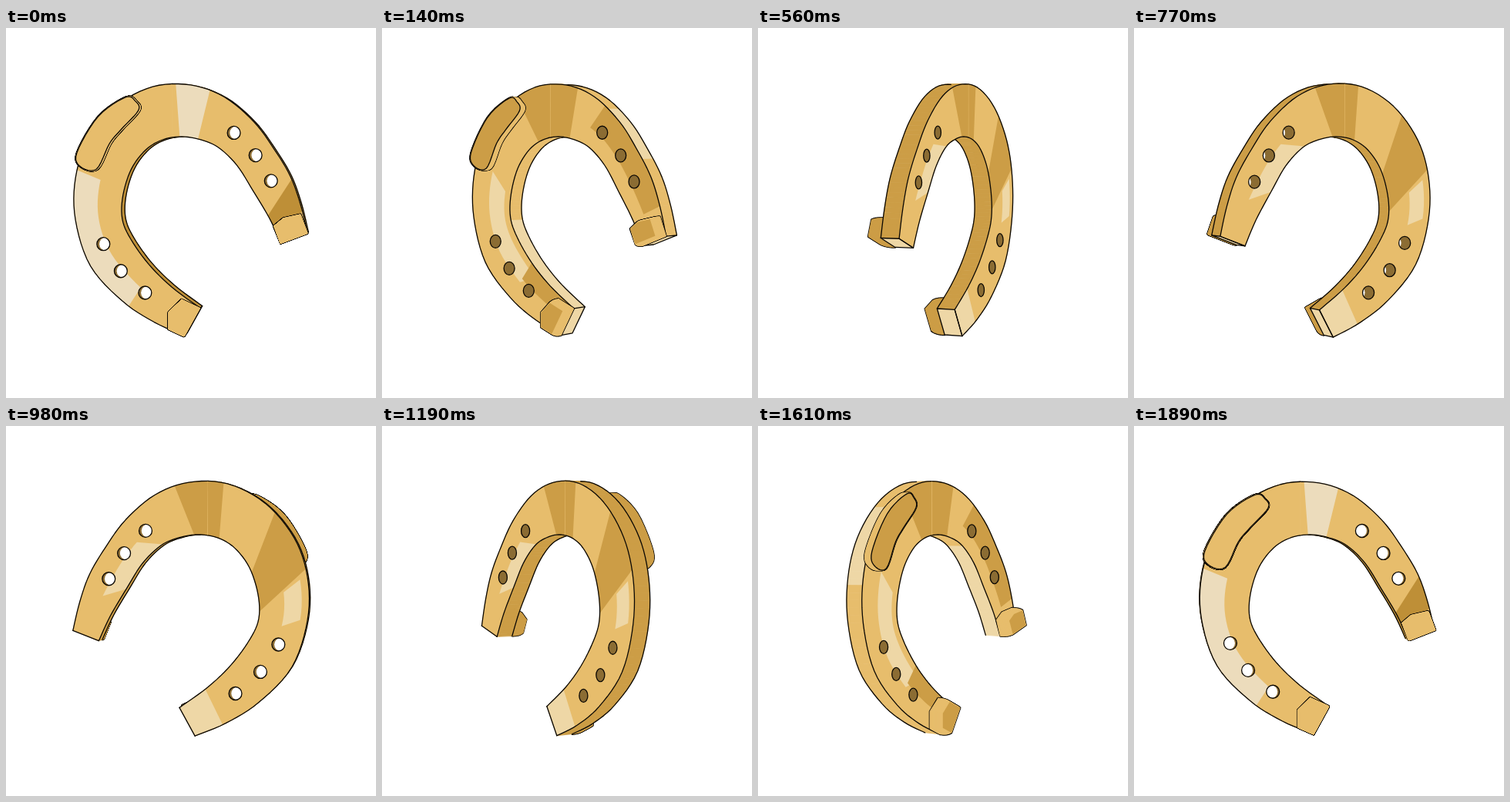
Animation, 480 px wide and 480 px high, one loop 1.96 s. Source, as an HTML page with a canvas:

```html
<!DOCTYPE html>
<html>
<head>
<meta charset="utf-8">
<style>
html, body { margin: 0; width: 100%; height: 100%; overflow: hidden; background: #fff; }
canvas { display: block; width: 480px; height: 480px; }
</style>
</head>
<body>
<canvas id="stage" width="480" height="480"></canvas>
<script>
const ctx = document.getElementById('stage').getContext('2d');
const STEP = 70, STEPS = 28;
const GOLD = '#e7bd6c', PALE = '#eed7a6', CREAM = '#ecdcbc', SHADE = '#cc9d46', DEEP = '#be8f37', BORE = '#8b6c33', INK = '#0a0703';

// A horseshoe turning about the upright axis x = 240; z grows towards the viewer.
const AXIS = 240, EYE_Y = 150, DEPTH = 0.0005;
const FRONT = 2, BACK = -24, SUB = 6, ENDS = 15, CROWN = 6.5, BORE_R = 8.5;

const parse = s => s.split(' ').map(p => p.split(',').map(Number));
const outer = parse('391,265 382,228 369,192 348,157 322,122 284,90 240,74 190,76 142,101 105,145 88,195 88,250 108,310 150,355 192,382 232,399');
const inner = parse('357,278 342,246 321,211 300,178 276,155 253,145 228,141 203,145 181,158 162,183 151,217 150,248 161,274 185,307 215,336 252,363');
const bores = parse('296,136 324,165 344,198 125,281 148,316 180,344');
const pad = rounded(parse('156,90 169,95 173,107 150,132 135,150 118,183 97,180 92,162 120,115'));
const heels = ['348,256 360,246 382,241 391,265 357,278', '228,352 252,363 232,399 212,390 212,368'].map(parse);

// Light and dark areas per view: from u0 to u1 along the arc, v0 to v1 from rim to opening, slant.
const areas = {
  flat: [[CREAM, 5.45, 6.4, 0, 1, -0.3], [CREAM, 9.8, 13.2, 0, 0.5, 0], [DEEP, 0.8, 1.9, 0, 1, -0.8]],
  tilted: [[SHADE, 1, 4.6, 0, 0.6, 0], [SHADE, 5.6, 7.6, 0, 1, -0.3], [PALE, 9.6, 13, 0.45, 0.85, 0.4], [SHADE, 13, 14.7, 0.55, 1, 0]],
  back: [[SHADE, 5.6, 6.9, 0, 1, 0.2], [SHADE, 8.3, 9.8, 0, 1, 0.9], [PALE, 10, 11, 0.15, 0.5, 0.2], [PALE, 1.5, 3.6, 0.55, 1, 0.5], [PALE, 14.1, 15, 0, 1, 0]],
  edge: [[SHADE, 0, ENDS, 0, 1, 0]]
};

const clamp = (x, lo, hi) => Math.max(lo, Math.min(hi, x));
const mix = (p, q, t) => [p[0] + (q[0] - p[0]) * t, p[1] + (q[1] - p[1]) * t];

function spline(a, b, c, d, t) {
  return [0, 1].map(k => b[k] + t * (c[k] - a[k] + t * (2 * a[k] - 5 * b[k] + 4 * c[k] - d[k]
    + t * (3 * b[k] - a[k] - 3 * c[k] + d[k]))) / 2);
}

function along(keys, u) {
  const i = Math.min(Math.floor(u), ENDS - 1), at = j => keys[clamp(j, 0, ENDS)];
  return spline(at(i - 1), at(i), at(i + 1), at(i + 2), u - i);
}

function rounded(keys) {
  const n = keys.length, at = i => keys[(i + n) % n];
  return Array.from({ length: n * SUB }, (_, j) => {
    const i = Math.floor(j / SUB);
    return spline(at(i - 1), at(i), at(i + 1), at(i + 2), j / SUB - i);
  });
}

function arc(from, to, v) {
  const n = Math.max(2, Math.ceil(Math.abs(to - from) * SUB));
  return Array.from({ length: n + 1 }, (_, j) => {
    const u = from + (to - from) * j / n;
    return mix(along(outer, u), along(inner, u), v);
  });
}

function trace(pts, closed = true) {
  const path = new Path2D();
  pts.forEach(p => path.lineTo(...p));
  if (closed) path.closePath();
  return path;
}
function fill(path, color) { ctx.fillStyle = color; ctx.fill(path); }
function ink(path, width = 1.3, color = INK) { ctx.lineWidth = width; ctx.strokeStyle = color; ctx.stroke(path); }
function paint(path, color) { fill(path, color); ink(path, 0.8, color); }

function drawShoe(angle) {
  const c = Math.cos(angle), s = Math.sin(angle), faceZ = c > 0 ? FRONT : BACK;
  const view = Math.abs(c) < 0.45 ? 'edge' : c < 0 ? 'back' : c > 0.85 ? 'flat' : 'tilted';

  const put = z => ([x, y]) => {
    const dx = x - AXIS, k = 1 + (dx * s + z * c) * DEPTH;
    return [AXIS + (dx * c - z * s) * k, EYE_Y + (y - EYE_Y) * k];
  };
  const line = (pts, z) => ink(trace(pts.map(put(z)), false));
  const wall = (p, q) => trace([...[p, q].map(put(BACK)), ...[q, p].map(put(FRONT))]);

  function wallColor(u, isInner) {
    if (view === 'back') return SHADE;
    if (view === 'flat') return isInner ? DEEP : GOLD;
    const lit = isInner ? Math.abs(u - 7.5) > 3.5 : Math.abs(Math.abs(u - 6.3) - 2.8) < 1;
    return lit ? PALE : GOLD;
  }

  function drawWall(lo, hi, v) {
    const pts = arc(lo, hi, v), seen = [];
    for (let i = 0; i + 1 < pts.length; i++) {
      const [p, q] = [pts[i], pts[i + 1]];
      if ((q[1] - p[1]) * s * (v ? 1 : -1) <= 0) continue;
      paint(wall(p, q), wallColor(lo + (hi - lo) * i / (pts.length - 1), v));
      seen.push(p, q);
    }
    if (seen.length) line(seen, c > 0 ? BACK : FRONT);
    // Thin slivers of wall show no crease against the face.
    return seen.length && view === 'flat' && Math.abs(s) < 0.16 && !v;
  }

  function drawEnd(u) {
    const p = along(outer, u), q = along(inner, u);
    if (s > 0) {
      const end = wall(p, q);
      fill(end, PALE);
      ink(end);
    }
    line([p, q], faceZ);
  }

  // Raised parts are stacks of slices that round off towards the top.
  function drawRaised(base, height, taper) {
    const mid = base.reduce((m, p) => [m[0] + p[0] / base.length, m[1] + p[1] / base.length], [0, 0]);
    const slices = Array.from({ length: 15 }, (_, j) => {
      const t = j / 14, scale = 1 - taper * t ** 3;
      return trace(base.map(p => mix(mid, p, scale)).map(put(FRONT + height * t)));
    });
    if (c < 0) slices.reverse();
    slices.forEach(f => ink(f, 2.6));
    slices.forEach(f => { fill(f, view === 'back' ? SHADE : GOLD); ink(f, 1, view === 'back' ? SHADE : GOLD); });
    if (c > 0) {
      const cap = slices[slices.length - 1];
      fill(cap, view === 'flat' ? GOLD : SHADE);
      if (!taper) ink(cap);
    }
  }

  function drawBore(p) {
    const [x, y] = put(faceZ)(p), rx = BORE_R * Math.max(Math.abs(c), 0.3);
    const ring = cx => { const e = new Path2D(); e.ellipse(cx, y, rx, BORE_R, 0, 0, 7); return e; };
    const rim = ring(x);
    fill(rim, BORE);
    ctx.save();
    ctx.clip(rim);
    fill(ring(x + (FRONT - BACK) * s * Math.sign(c)), '#fff');
    ctx.restore();
    ink(rim);
  }

  function drawHalf(side) {
    const [lo, hi] = side ? [CROWN, ENDS] : [0, CROWN];
    const raised = () => {
      drawRaised(heels[side], 20, 0.15);
      if (side) drawRaised(pad, 11, 0);
    };
    const band = (u0, u1, v0, v1, slant) => {
      const [a, b, d, e] = [u0, u1, u1 + slant, u0 + slant].map(u => clamp(u, lo, hi));
      return trace([...arc(a, b, v0), ...arc(d, e, v1)].map(put(faceZ)));
    };
    if (c < 0) raised();
    drawWall(lo, hi, 1);
    drawWall(lo, hi, 0);
    paint(band(lo, hi, 0, 1, 0), GOLD);
    for (const [color, ...where] of areas[view]) {
      if (where[0] < hi && where[1] > lo) fill(band(...where), color);
    }
    line(arc(lo, hi, 0), faceZ);
    line(arc(lo, hi, 1), faceZ);
    drawEnd(side ? hi : lo);
    bores.slice(side * 3, side * 3 + 3).forEach(drawBore);
    if (c > 0) raised();
  }

  const far = s > 0 ? 1 : 0;
  drawHalf(far);
  drawHalf(1 - far);
}

// The turn slows a little whenever the shoe lies flat to the viewer.
function angleAt(step) {
  const turn = step / STEPS * 2 * Math.PI;
  return turn + (12 - 5 * Math.cos(2 * turn)) * Math.PI / 180;
}

let shown = -1;
function tick() {
  const step = Math.floor(performance.now() / STEP) % STEPS;
  if (step !== shown) {
    shown = step;
    ctx.fillStyle = '#fff';
    ctx.fillRect(0, 0, 480, 480);
    ctx.lineCap = ctx.lineJoin = 'round';
    drawShoe(angleAt(step));
  }
  requestAnimationFrame(tick);
}
tick();
</script>
</body>
</html>
```
